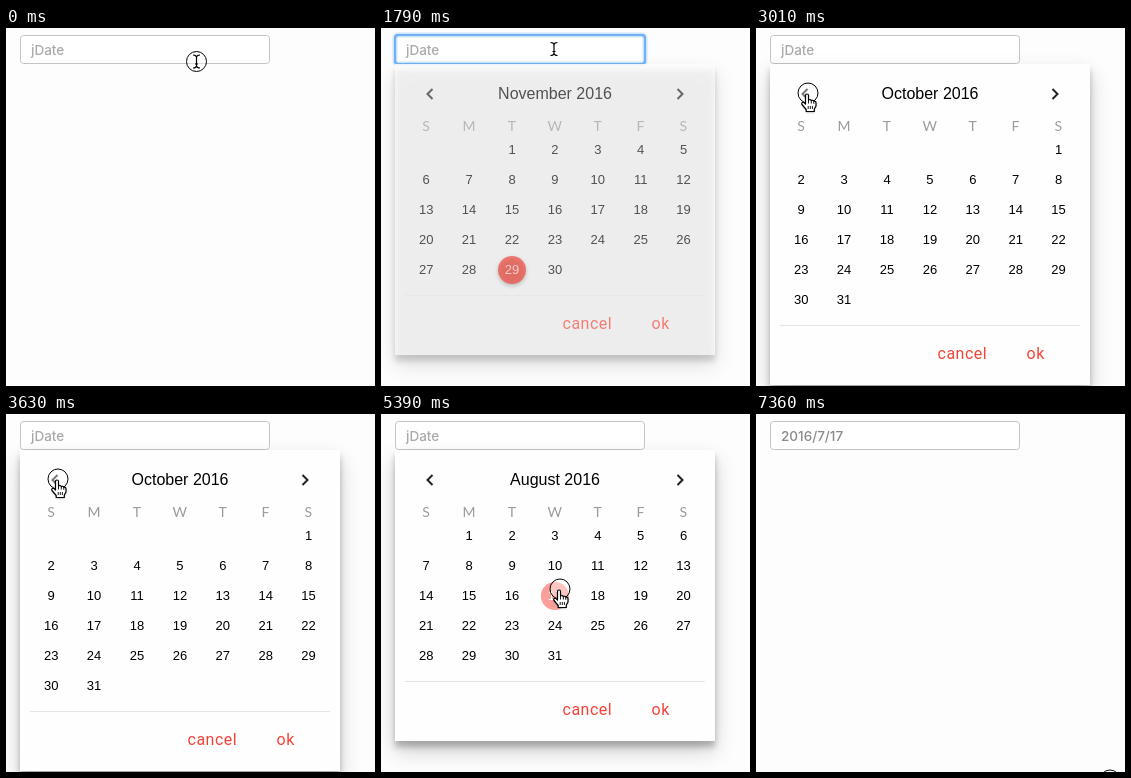
Write an HTML page with a canvas that moves like this. It is 369 px wide and 358 px high and loops after 7.46 s.

```html
<!DOCTYPE html>
<html lang="en">
<head>
<meta charset="utf-8">
<title>Date picker</title>
<style>
  html, body { margin: 0; width: 100%; height: 100%; overflow: hidden; background: #fdfdfd; }
  canvas { display: block; width: 369px; height: 358px; }
</style>
</head>
<body>
<canvas id="stage"></canvas>
<script>
const W = 369, H = 358, LOOP = 7460;
const RED = '#f44336';
const canvas = document.getElementById('stage');
const ctx = canvas.getContext('2d');
const dpr = window.devicePixelRatio || 1;
canvas.width = W * dpr;
canvas.height = H * dpr;

// Bursts of activity: first step, last step, number of steps. The picture rests between them.
const bursts = [
  [0, 0, 1], [90, 90, 1], [440, 440, 1], [1430, 1870, 6], [2140, 2840, 9],
  [2920, 3280, 5], [3630, 3800, 3], [4240, 4420, 3], [4590, 5210, 8],
  [5390, 5390, 1], [5570, 6260, 9], [6350, 6960, 8], [7360, 7360, 1]
];

// Pointer waypoints: time, x, y, shape
const waypoints = [
  [0, 190.5, 33.5, 'beam'], [90, 183, 60, 'arrow'], [440, 183, 61, 'arrow'],
  [1430, 181, 47, 'arrow'], [1518, 173, 21, 'beam'], [2050, 173, 21, 'beam'],
  [2140, 169, 34, 'arrow'], [2315, 151, 122, 'arrow'], [2402, 145, 141, 'arrow'],
  [2490, 128, 134, 'arrow'], [2665, 72, 87, 'arrow'], [2840, 51, 66, 'hand'],
  [4500, 51, 66, 'hand'], [4590, 57, 73, 'arrow'], [4850, 118, 137, 'arrow'],
  [5120, 174, 174, 'hand'], [5210, 178, 176, 'hand'], [5650, 178, 176, 'hand'],
  [5740, 188, 190, 'arrow'], [6000, 248, 266, 'arrow'], [6170, 272, 290, 'arrow'],
  [6260, 275, 293, 'arrow'], [6350, 276, 292, 'arrow'], [6610, 278, 294, 'arrow'],
  [6870, 337, 345, 'arrow'], [6960, 353, 367, 'arrow'], [LOOP, 353, 367, 'arrow']
];

// Times at which the mouse button is held
const presses = [
  [0, 90], [1600, 1780], [2920, 3090], [3630, 3800], [4240, 4415],
  [5390, 5570], [6430, 6520], [7360, LOOP]
];

const months = [
  { from: 0, name: 'November 2016', first: 2, days: 30 },
  { from: 3000, name: 'October 2016', first: 6, days: 31 },
  { from: 3710, name: 'September 2016', first: 4, days: 30 },
  { from: 4320, name: 'August 2016', first: 1, days: 31 }
];

const clamp = v => Math.max(0, Math.min(1, v));
const within = (t, a, b) => t >= a && t < b;

function stepTime(t) {
  const [a, b, n] = bursts.filter(s => s[0] <= t).pop();
  if (n === 1) return a;
  const gap = (b - a) / (n - 1);
  return a + gap * Math.min(n - 1, Math.floor((t - a + 6) / gap));
}

function pointerAt(t) {
  const i = Math.max(0, waypoints.findIndex(p => p[0] > t) - 1);
  const [t0, x0, y0, shape] = waypoints[i], [t1, x1, y1] = waypoints[i + 1];
  const k = clamp((t - t0) / (t1 - t0));
  return { x: x0 + (x1 - x0) * k, y: y0 + (y1 - y0) * k, shape };
}

function text(str, x, y, font, color, align = 'left', spacing = '0px') {
  ctx.font = font;
  ctx.fillStyle = color;
  ctx.textAlign = align;
  ctx.letterSpacing = spacing;
  ctx.fillText(str, x, y);
}

function box(x, y, w, h, r) {
  ctx.beginPath();
  ctx.roundRect(x, y, w, h, r);
}

function disc(x, y, r, fill) {
  ctx.beginPath();
  ctx.arc(x, y, r, 0, 7);
  ctx.fillStyle = fill;
  ctx.fill();
}

function withShadow(y, blur, alpha, draw) {
  ctx.save();
  ctx.shadowColor = `rgba(0,0,0,${alpha})`;
  ctx.shadowOffsetY = y * dpr;
  ctx.shadowBlur = blur * dpr;
  draw();
  ctx.restore();
}

function drawInput(t) {
  const focused = within(t, 1600, 2920);
  ctx.lineWidth = 1;
  ctx.strokeStyle = '#c4c4c4';
  ctx.fillStyle = '#fff';
  box(14.5, 7.5, 249, 28, 3);
  ctx.fill();
  ctx.stroke();
  if (focused) {
    ctx.strokeStyle = 'rgba(110,178,245,.35)';
    ctx.lineWidth = 5;
    box(14, 7, 250, 29, 3);
    ctx.stroke();
    ctx.strokeStyle = '#6eb2f5';
    ctx.lineWidth = 2;
    ctx.stroke();
  }
  const picked = t > 6500;
  text(picked ? '2016/7/17' : 'jDate', 25, 27, '500 13.5px Inter, sans-serif', picked ? '#8a8a8a' : '#aaa');
}

function drawChevron(x, dir) {
  ctx.beginPath();
  ctx.moveTo(x - 2.5 * dir, 61);
  ctx.lineTo(x + 2.5 * dir, 66);
  ctx.lineTo(x - 2.5 * dir, 71);
  ctx.strokeStyle = '#222';
  ctx.lineWidth = 2;
  ctx.stroke();
}

function drawDays(month, t) {
  const isAugust = month === months[3];
  const marked = month === months[0] ? 29 : isAugust && t > 5100 ? 17 : 0;
  const hoverOnly = isAugust && t < 5560;
  for (let day = 1; day <= month.days; day++) {
    const cell = month.first + day - 1;
    const x = 45.2 + 42.9 * (cell % 7);
    const y = 122 + 30 * Math.floor(cell / 7);
    if (day === marked) {
      if (hoverOnly) disc(x, y, 14, '#f9a09a');
      else withShadow(2, 4, .3, () => disc(x, y, 14, RED));
    }
    text(day, x, y + 4.3, '13px "Liberation Sans", Arial, sans-serif', day === marked ? '#fff' : '#000', 'center');
  }
}

function drawCalendar(t) {
  const alpha = t < 3000 ? clamp((t - 1650) / 200) : clamp((6600 - t) / 130);
  if (!alpha) return;
  const month = months.filter(m => m.from <= t).pop();
  const rows = Math.ceil((month.first + month.days) / 7);
  const extra = (rows - 5) * 30;

  ctx.save();
  ctx.globalAlpha = alpha;
  const panel = () => {
    ctx.fillStyle = '#fefefe';
    ctx.fillRect(14, 36, 320, 291 + extra);
  };
  withShadow(10, 20, .19, panel);
  withShadow(6, 6, .23, panel);

  drawChevron(49, -1);
  drawChevron(299, 1);
  text(month.name, 174, 71, '16px "Liberation Sans", Arial, sans-serif', '#000', 'center');
  [...'SMTWTFS'].forEach((d, i) =>
    text(d, 45 + 42.9 * i, 103, '14px Lato, sans-serif', '#9b9b9b', 'center'));
  drawDays(month, t);

  ctx.fillStyle = '#e4e4e4';
  ctx.fillRect(24, 267 + extra, 300, 1);
  if (t > 6300) {
    ctx.fillStyle = '#f2f2f2';
    box(251, 278, 58, 34, 3);
    ctx.fill();
    disc(280, 295, 20.5, '#e6e6e6');
  }
  const buttonFont = '16px Roboto, sans-serif';
  text('cancel', 181.5, 301 + extra, buttonFont, RED, 'left', '0.5px');
  text('ok', 270.5, 301 + extra, buttonFont, RED, 'left', '0.5px');
  ctx.restore();
}

const arrow = new Path2D('M0 0V14.2L3.2 11.2 5.6 16.4 8 15.4 5.7 10.3H10Z');
const beam = new Path2D('M-3.5 -6.5Q-.5 -6.5 0 -4.5Q.5 -6.5 3.5 -6.5M0 -5V5M-3.5 6.5Q-.5 6.5 0 4.5Q.5 6.5 3.5 6.5M-1.5 2.5H1.5');
const hand = new Path2D('M-1.5 10V1.2Q-1.5 0 0 0T1.5 1.2V6Q3.5 4.8 4.3 6.6Q6.2 5.6 6.8 7.4Q9 6.7 9 9V12L7.3 15V17.5H-.8V15.5L-5 10.5Q-5.8 8.8 -4.3 8.3Q-3.2 8 -1.5 10Z');
const knuckles = new Path2D('M1.5 6V9.5M4.3 6.8V9.5M6.8 7.6V9.8M1.2 12V15M3.3 12V15M5.4 12V15');

function drawPointer(t) {
  const { x, y, shape } = pointerAt(t);
  const pressed = presses.some(([a, b]) => within(t, a, b));
  ctx.save();
  ctx.translate(x, y);
  ctx.lineJoin = 'round';
  if (pressed) {
    const shift = shape === 'beam' ? 0 : 1;
    disc(shift, -shift, 10, 'rgba(255,255,255,.4)');
    ctx.strokeStyle = '#000';
    ctx.lineWidth = 1;
    ctx.stroke();
  }
  if (shape === 'arrow') {
    ctx.strokeStyle = '#fff';
    ctx.lineWidth = 2;
    withShadow(1, 2, .45, () => ctx.stroke(arrow));
    ctx.fillStyle = '#000';
    ctx.fill(arrow);
  } else if (shape === 'hand') {
    ctx.fillStyle = '#fff';
    withShadow(1, 2, .35, () => ctx.fill(hand));
    ctx.strokeStyle = '#000';
    ctx.lineWidth = 1.2;
    ctx.stroke(hand);
    ctx.lineWidth = .9;
    ctx.stroke(knuckles);
  } else {
    ctx.strokeStyle = '#000';
    ctx.lineWidth = 1.2;
    ctx.stroke(beam);
  }
  ctx.restore();
}

function render(now) {
  const t = stepTime(now % LOOP);
  ctx.setTransform(dpr, 0, 0, dpr, 0, 0);
  ctx.fillStyle = '#fdfdfd';
  ctx.fillRect(0, 0, W, H);
  drawInput(t);
  drawCalendar(t);
  drawPointer(t);
}

const start = performance.now();
function tick() {
  render(performance.now() - start);
  requestAnimationFrame(tick);
}
tick();
</script>
</body>
</html>
```
